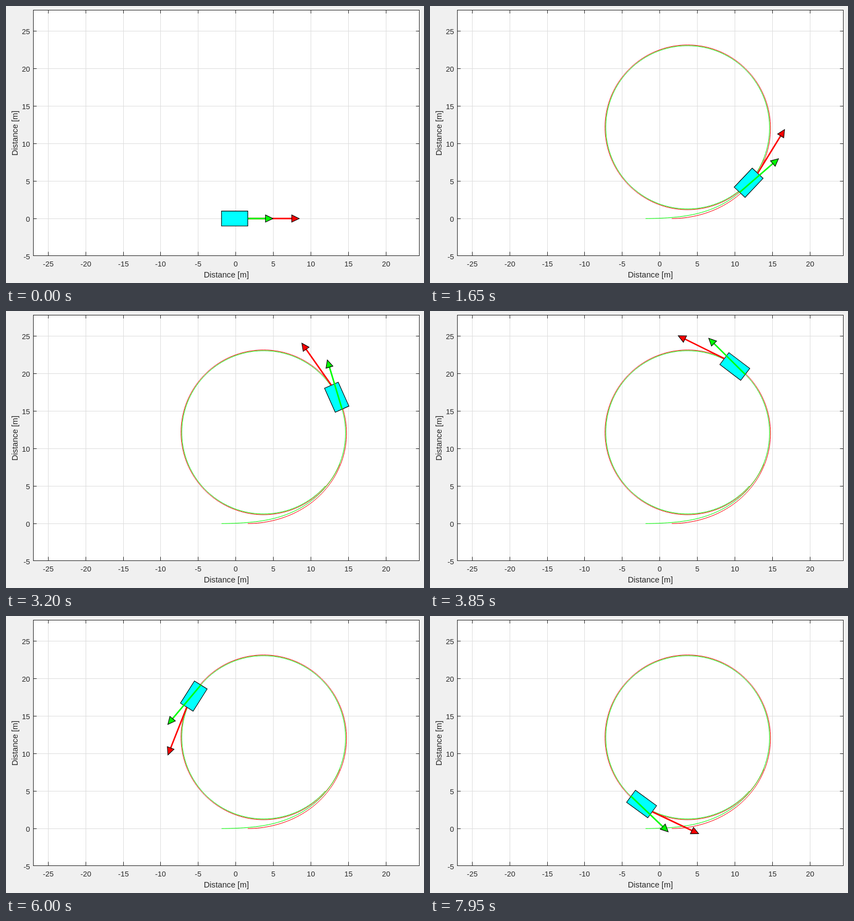
Write an HTML page that moves like this. It is 756x502 px and loops after 8 s.

```html
<!DOCTYPE html>
<html lang="en">
<head>
<meta charset="utf-8">
<title>Vehicle skid pad</title>
<style>
  html, body { margin: 0; width: 100%; height: 100%; overflow: hidden; background: #f0f0f0; }
  svg { display: block; width: 756px; height: 502px; font-family: "Liberation Sans", Arial, sans-serif; fill: #262626; }
  .line { fill: none; stroke-width: 1; }
  .head, #car { stroke: #000; stroke-width: 1.1; stroke-linejoin: miter; }
</style>
</head>
<body>
<svg viewBox="0 0 756 502">
  <rect x="49.5" y="7.5" width="698" height="445" fill="#fff"/>
  <path id="grid" class="line" stroke="#dedede"/>
  <path id="ticks" class="line" stroke="#262626"/>
  <rect x="49.5" y="7.5" width="698" height="445" class="line" stroke="#262626"/>
  <g id="labels" font-size="13.33"></g>
  <g font-size="14.67" text-anchor="middle">
    <text x="398.5" y="492">Distance [m]</text>
    <text transform="translate(21 230.5) rotate(-90)">Distance [m]</text>
  </g>
  <g id="trails">
    <path id="frontTrail" class="line" stroke="#f00"/>
    <path id="rearTrail" class="line" stroke="#0f0"/>
  </g>
  <g id="vehicle">
    <path id="car" fill="#0ff"/>
    <g id="arrows">
      <g id="frontArrow" fill="#f00" stroke="#f00"></g>
      <g id="rearArrow" fill="#0f0" stroke="#0f0"></g>
    </g>
  </g>
</svg>
<script>
const $ = id => document.getElementById(id);
const SCALE = 13.575, OX = 415.4, OY = 385.2;
const px = (x, y) => [OX + x * SCALE, OY - y * SCALE];
const points = list => 'M' + list.map(p => p.map(v => v.toFixed(2)).join(' ')).join('L');

function drawAxes() {
  const snap = v => Math.floor(v + 0.3) + 0.5;
  let grid = '', ticks = '', labels = '';
  for (let m = -25; m <= 20; m += 5) {
    const x = snap(px(m, 0)[0]);
    grid += `M${x} 8V452`;
    ticks += `M${x} 452v-6.5M${x} 8v5.5`;
    labels += `<text x="${x}" y="472" text-anchor="middle">${m}</text>`;
  }
  for (let m = -5; m <= 25; m += 5) {
    const y = Math.floor(px(0, m)[1]) + 0.5;
    if (m > -5) {
      grid += `M50 ${y}H747`;
      ticks += `M50 ${y}h5.5M747 ${y}h-5.5`;
    }
    labels += `<text x="43.5" y="${y + 5}" text-anchor="end">${m}</text>`;
  }
  $('grid').setAttribute('d', grid);
  $('ticks').setAttribute('d', ticks);
  $('labels').innerHTML = labels;
}

// Single-track vehicle with saturating tyres, constant speed and fixed steering.
const SPEED = 30 / 3.6, STEER = 20 * Math.PI / 180;
const MASS_F = 700, MASS_R = 600, MASS = MASS_F + MASS_R, INERTIA = 10000;
const LENGTH = 3.5, LF = LENGTH * MASS_R / MASS, LR = LENGTH - LF, HALF_WIDTH = 1;
const DT = 0.001, END = 10, STEP = 0.05;

function tyreForce(slip, mass) {
  const x = 8.56 * slip, phi = 2 * x - Math.atan(x);
  return 0.8 * mass * 9.81 * phi / Math.hypot(1, phi);
}

function simulate() {
  const poses = [], every = Math.round(STEP / DT), count = Math.round(END / DT);
  let x = 0, y = 0, heading = 0, drift = 0, yaw = 0;
  for (let i = 0; i <= count; i++) {
    if (i % every === 0) poses.push(pose(x, y, heading, drift, yaw));
    const front = tyreForce(STEER - drift - LF * yaw / SPEED, MASS_F) * Math.cos(STEER);
    const rear = tyreForce(LR * yaw / SPEED - drift, MASS_R);
    x += SPEED * Math.cos(heading + drift) * DT;
    y += SPEED * Math.sin(heading + drift) * DT;
    heading += yaw * DT;
    drift += ((front + rear) / (MASS * SPEED) - yaw) * DT;
    yaw += (LF * front - LR * rear) / INERTIA * DT;
  }
  return poses;
}

function pose(x, y, heading, drift, yaw) {
  const c = Math.cos(heading), s = Math.sin(heading);
  const at = (along, side) => px(x + along * c - side * s, y + along * s + side * c);
  const course = along =>
    heading + Math.atan2(SPEED * Math.sin(drift) + along * yaw, SPEED * Math.cos(drift));
  return {
    front: at(LF, 0), rear: at(-LR, 0),
    frontCourse: course(LF), rearCourse: course(-LR),
    corners: [at(LF, HALF_WIDTH), at(LF, -HALF_WIDTH), at(-LR, -HALF_WIDTH), at(-LR, HALF_WIDTH)]
  };
}

function place(id, [x, y], course) {
  $(id).setAttribute('transform', `translate(${x} ${y}) rotate(${-course * 180 / Math.PI})`);
}

drawAxes();
for (const id of ['frontArrow', 'rearArrow'])
  $(id).innerHTML = '<path d="M0 0H80" stroke-width="2.67"/><path class="head" d="M93 0L79.5 -6.5V6.5Z"/>';

const poses = simulate();
$('frontTrail').setAttribute('d', points(poses.map(p => p.front)));
$('rearTrail').setAttribute('d', points(poses.map(p => p.rear)));

let shown = -1;
function render(time) {
  const step = Math.floor((time % 8000) / 50);
  if (step !== shown) {
    shown = step;
    const p = poses[Math.max(0, step - 1)];
    $('car').setAttribute('d', points(p.corners) + 'Z');
    place('frontArrow', p.front, p.frontCourse);
    place('rearArrow', p.rear, p.rearCourse);
    // The opening picture has no trails and the car lies over the arrows.
    $('trails').style.display = step ? '' : 'none';
    $('vehicle').append($(step ? 'arrows' : 'car'));
  }
}
const start = performance.now();
function tick() {
  render(performance.now() - start);
  requestAnimationFrame(tick);
}
tick();
</script>
</body>
</html>
```
